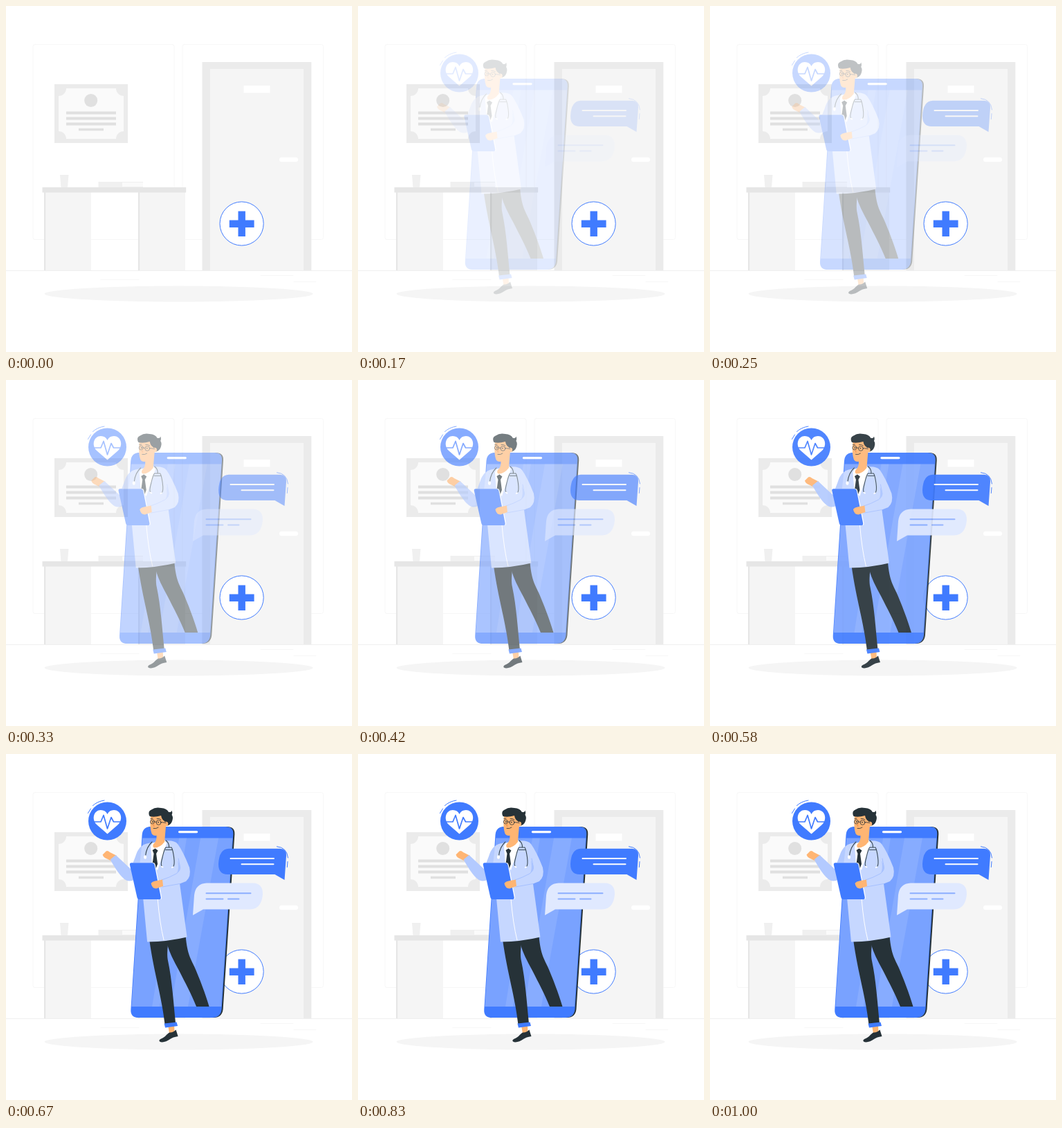
Write an HTML page that moves like this. It is 500 px wide and 500 px high and loops after 1.04 s.

```html
<!DOCTYPE html>
<html lang="en">
<head>
<meta charset="utf-8">
<title>Online doctor</title>
<style>
  html, body { margin: 0; width: 100%; height: 100%; overflow: hidden; background: #fff; }
  svg { display: block; width: 100%; height: 100%; }
  .line { fill: none; stroke-linecap: round; stroke-linejoin: round; }
  .blue { fill: #407bff; }
  .dark { fill: #263238; }
  .skin { fill: #ffb573; }
  .coat { fill: #c6d7ff; }
  .grey { fill: #ebebeb; }
  .pale { fill: #f5f5f5; }
</style>
</head>
<body>
<svg viewBox="0 0 500 500">
  <!-- room -->
  <g class="line" stroke="#f7f7f7">
    <rect x="39" y="55.5" width="204" height="282" rx="3"/>
    <rect x="255" y="55.5" width="203.5" height="282" rx="3"/>
    <path stroke="#efefef" d="M0 382.5H500"/>
    <path d="M137 395.5H192M368 389.5H415M416 398.5H448"/>
  </g>
  <path class="grey" d="M70 113H176V198H70Z"/>
  <path fill="#fafafa" d="M87 119H159A11 11 0 0 0 170 130V181A11 11 0 0 0 159 192H87A11 11 0 0 0 76 181V130A11 11 0 0 0 87 119Z"/>
  <g fill="#e0e0e0">
    <circle cx="122.7" cy="136.5" r="9.5"/>
    <path d="M87 152.5h72v4h-72zM87 160.5h72v4h-72zM87 168.5h72v4h-72zM105 176.7h36v3.6h-36z"/>
  </g>
  <path class="pale" d="M55 269H123V382H55ZM191 269H259V382H191Z"/>
  <path fill="#e6e6e6" d="M55 269h2.2v113h-2.2zM191 269h2.2v113h-2.2zM52.5 262h207.7v7.6H52.5z"/>
  <path fill="#f0f0f0" d="M78 244H90.5L89 262H79.5ZM133.5 254H198V262H133.5Z"/>
  <path fill="#fafafa" d="M168 255h30v6h-30z"/>
  <path class="grey" d="M283.5 81H441.3V382H283.5Z"/>
  <path class="pale" d="M295 91H430V382H295Z"/>
  <path fill="#fff" d="M343.5 115h38v10.5h-38z"/>
  <rect fill="#fff" x="395" y="218.7" width="27" height="6.6" rx="3.3"/>
  <ellipse class="pale" cx="249.7" cy="416" rx="194" ry="11.4"/>

  <!-- plus badge -->
  <circle cx="340.6" cy="314.5" r="31.6" fill="#fff" stroke="#407bff"/>
  <path class="blue" d="M335.5 296.5h10.4v13h12.7v10.4h-12.7v13h-10.4v-13h-12.7v-10.4h12.7z"/>

  <g id="mover">
    <!-- phone -->
    <path id="shell" class="dark" transform="translate(2)" d="M209 105H317Q329 105 328.3 116L311.5 369Q310 381 298 381H191Q179.500 381 180.300 369L196.500 117Q197.500 105 209 105Z"/>
    <path class="blue" d="M209 105H317Q329 105 328.3 116L311.5 369Q310 381 298 381H191Q179.500 381 180.300 369L196.500 117Q197.500 105 209 105Z"/>
    <path fill="#79a2ff" d="M197.200 121.500H327.300L311 365H181.300Z"/>
    <path fill="#fff" opacity=".1" d="M250 121.500H261L222 365H211ZM281 121.500H307L263 365H238Z"/>
    <path class="line" stroke="#fff" stroke-width="3.200" d="M250.500 112.600H275.500"/>

    <!-- legs -->
    <path class="dark" d="M232 266L259.500 263C262 290 267 296 272 307C279 323 288 346 293.500 365H275C267 345 259 331 250 313C242 298 236 287 233 275Z"/>
    <path class="dark" d="M207 268L235 266C233 282 232.500 292 234 299C240 327 242 360 245 389L229.500 391C225 350 214 318 207 268Z"/>
    <path class="skin" d="M234 392H243L243.500 402L236 404Z"/>
    <path class="blue" d="M228.500 389.500L246.500 387.500L248 393L230 395.500Z"/>
    <path class="dark" d="M236 402.500Q241 403 245.500 398.500L248.500 408Q241 409 237 412C232 416 225 417.500 222 415.500Q220 413.500 224 411.500C229 410 232 405 236 402.500Z"/>

    <!-- raised arm -->
    <path class="skin" d="M139.500 145.500L144.500 140.500Q147 139 150 142L160 147L152 154.500L146 151.500Q141 150 139.500 145.500Z"/>
    <path fill="#b3caff" d="M150.500 152.500L158.500 146L180 166L187 148C190 138 195 131 204 129.500L206 166L186 181Q177 187 169 179Q162 173 150.500 152.500Z"/>

    <!-- coat, shirt and tie -->
    <path class="coat" d="M196 134Q200 129 212 128L231 125.500Q243 124.500 248 130Q256 141 265 164Q268 177 260 184L251 187.500L261.500 264.500Q235 271 204 271.500L198 208L193 160Z"/>
    <path fill="#fff" d="M211.500 129L229 124L232 129L219 168L211 160L209 133Z"/>
    <path class="skin" d="M218 112L231 103L229 127Q222 136 214 135.500Q211 134 213 130Q218 126 217.500 118Z"/>
    <path class="dark" d="M211.500 139L215.500 136.500L219.500 139.500L217 144L219 159L215.500 168L211.500 159L213.500 144Z"/>
    <path class="line" stroke="#fff" d="M219 209Q222 245 228 269"/>
    <path class="line" stroke="#9dbaff" stroke-width=".8" d="M249 151L251 161Q252 169 246 173Q235 179 225 182M226 192L251 187.500"/>
    <path fill="#a9c3ff" d="M248 154L252 163Q253 168 247 172Q250 166 248 154Z"/>

    <!-- stethoscope -->
    <g class="line" stroke="#37474f" stroke-width="1.100">
      <path d="M211 127Q203 134 201.500 147M231 125Q236 129 235.500 135M225 162Q223 160 226 149Q229 136 231 135H239Q241 138 242.500 149Q244 160 241.500 163M230.500 138.500H240.500"/>
    </g>
    <ellipse cx="201" cy="149" rx="2" ry="2.800" fill="#fff"/>
    <path class="line" stroke="#fff" stroke-width="1.800" d="M224.800 162.500L226.500 163.500M241.300 163.300L239.800 164"/>

    <!-- head -->
    <path class="skin" d="M209 87L230 88L231 104Q228 114 221 117Q213 119.500 210.500 115Q208 108 208.500 98Z"/>
    <path class="dark" d="M207.500 90Q204 83 210 80.500Q216 76 224 78Q232 78.500 235 84Q239 84.500 239.500 81.500Q241 85 239.500 88Q242 91 240 97Q238 103 231 104L229 97Q225 95 224 89Q214 92 207.500 90Z"/>
    <circle class="skin" cx="231" cy="101" r="3.200"/>
    <g class="line" stroke="#263238" stroke-width=".8">
      <circle cx="211.500" cy="98" r="3"/>
      <circle cx="220.500" cy="99" r="3.400"/>
      <path d="M214.500 98L217 98.400M224 98.500L231 99.500M209 93.500L212 93M218 93.500Q221 92.500 224 95M213 107.500Q217 108.500 220 106"/>
    </g>
    <circle class="dark" cx="212" cy="98" r=".9"/>
    <circle class="dark" cx="220" cy="98.600" r=".9"/>
    <path class="line" stroke="#ed893e" stroke-width=".8" d="M214.500 99L212.500 104H214.500"/>

    <!-- clipboard -->
    <path fill="#fff" d="M183 157H213Q215 157 215.700 160L225 207Q225.300 210 223 210H192Z"/>
    <path class="blue" d="M181 157.300H211.500Q213.700 157.300 214.500 160L223.700 207Q224 210 222 210H192.500Q190 210 189.300 207L178.800 160Q178.500 157.300 181 157.300Z"/>
    <path class="skin" d="M209.500 187Q211 184 218 183L226 181.500L227 191L217 194.500Q211 194.500 209.500 187Z"/>
  </g>

  <!-- chat bubbles -->
  <g class="fade">
    <path class="blue" d="M322 136.800H396Q405.500 137 405 147L402.500 182L388.500 174H320Q307 174 307 159Q308 137 322 136.800Z"/>
    <path class="line" stroke="#fff" stroke-width="2" d="M324.500 151H387M340.500 159.300H386.500"/>
    <path class="line" stroke="#407bff" d="M391.500 133.700Q406 135 407.500 150M407 155.500L406.300 163.500"/>
  </g>
  <g class="fade">
    <path fill="#e0e9ff" d="M290 186.500H357Q371.500 187 371 203Q369 224 353 224.500H285L270 233L272 204Q274 187 290 186.500Z"/>
    <path class="line" stroke="#8caeff" stroke-width="2" d="M289.500 201.200H353.500M289.500 209.500H313.500M321 209.500H336.500"/>
  </g>

  <!-- heart badge -->
  <g class="fade">
    <circle class="blue" cx="146.500" cy="97" r="27.500"/>
    <path fill="#fff" d="M146.500 115.500L131 102C123 94 127 81 137 81Q144 81 146.500 87Q149 81 156 81C166 81 170 94 162 102Z"/>
    <path class="line" stroke="#407bff" stroke-width="1.700" d="M127 98H137L141 88.500L146.500 108L152 91.500L155.500 98H166"/>
    <path class="line" stroke="#407bff" d="M118.500 85.500L122.500 79M125.500 74.500Q132 68.500 142 67"/>
  </g>
</svg>
<script>
  const LOOP = 1040, STEP = 1000 / 24, TRAVEL = 30;
  const mover = document.getElementById('mover');
  const faders = [mover, ...document.querySelectorAll('.fade')];

  const cubic = (s, a, b) => 3 * (1 - s) ** 2 * s * a + 3 * (1 - s) * s * s * b + s ** 3;

  // Overshooting cubic-bezier(.36, -.01, .5, 1.38)
  function ease(x) {
    let lo = 0, hi = 1;
    for (let i = 0; i < 24; i++) {
      const mid = (lo + hi) / 2;
      if (cubic(mid, .36, .5) < x) lo = mid; else hi = mid;
    }
    return cubic(lo, -.01, 1.38);
  }

  function draw(now) {
    const tick = Math.floor((now % LOOP + 5) / STEP);
    const p = tick < 2 ? 0 : ease(Math.min(1, (tick + 1.1) / 25));
    const opacity = Math.max(0, Math.min(1, p));
    mover.setAttribute('transform', `translate(${TRAVEL * (p - 1)})`);
    for (const el of faders) el.setAttribute('opacity', opacity);
    requestAnimationFrame(() => draw(performance.now()));
  }
  draw(performance.now());
</script>
</body>
</html>
```
